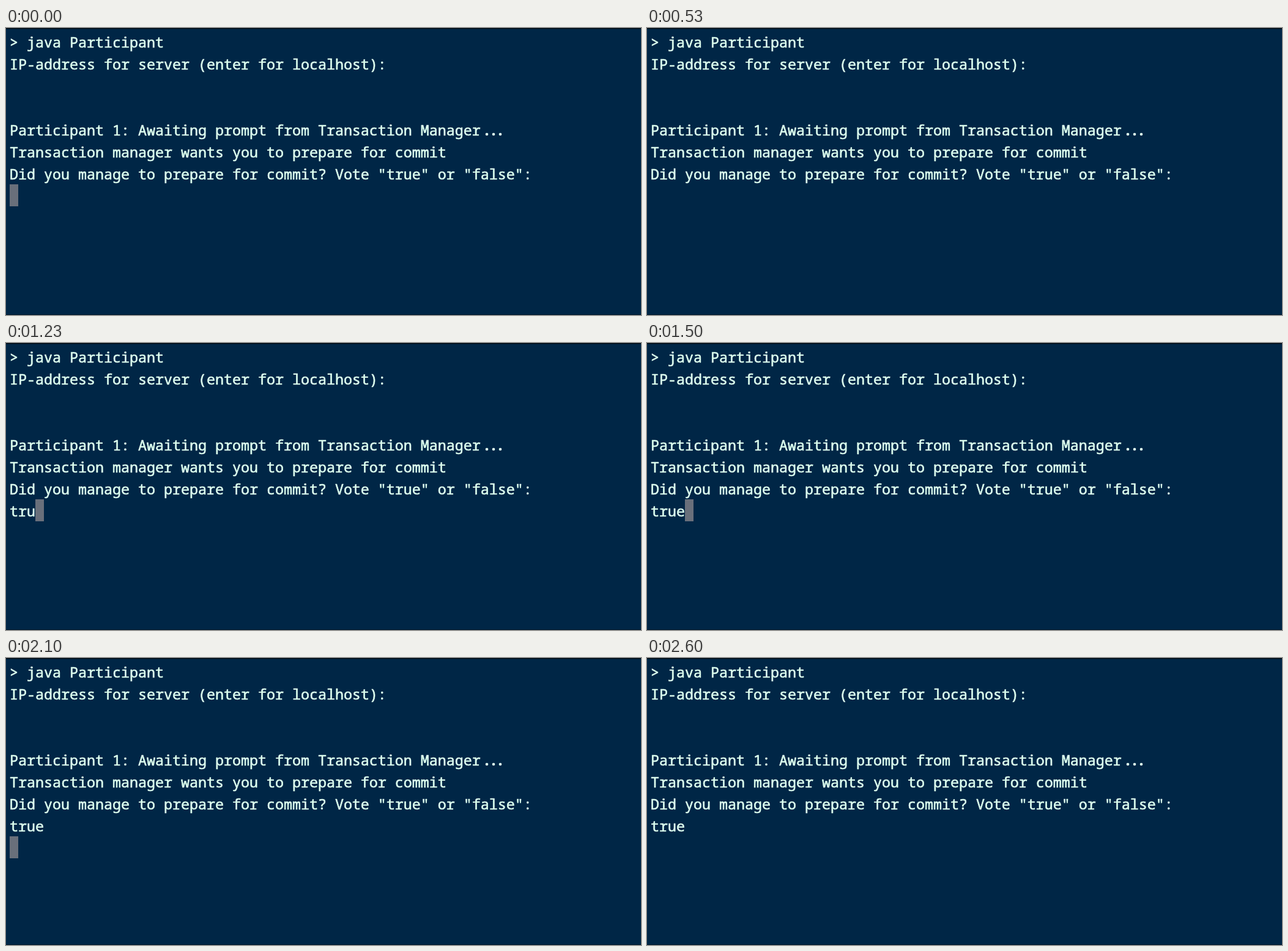
Animation, 1038 px wide and 470 px high, one loop 2650 ms. Source, as an HTML page with a canvas:

```html
<!DOCTYPE html>
<html lang="en">
<head>
<meta charset="utf-8">
<title>Terminal vote</title>
<style>
  html, body { margin: 0; width: 100%; height: 100%; overflow: hidden; background: #002646; }
  canvas { display: block; }
</style>
</head>
<body>
<canvas id="stage" width="1038" height="470"></canvas>
<script>
const ctx = document.getElementById('stage').getContext('2d');
const LOOP = 2650, LEFT = 6, TOP = 4, CELL = 14, ROW = 36, BASE = 28;
const INK = '#dffff0';
const OUTPUT = [
  '> java Participant',
  'IP-address for server (enter for localhost):',
  '', '',
  'Participant 1: Awaiting prompt from Transaction Manager',
  'Transaction manager wants you to prepare for commit',
  'Did you manage to prepare for commit? Vote "true" or "false":'
];
const ANSWER = 'true';
const KEYS = [800, 980, 1140, 1300];  // one keystroke per letter
const ENTER = 1600;
const HIDDEN = [[310, 800], [2200, LOOP]];  // cursor blinks off

// A thin outline gives the letters a medium weight.
function print(text, row) {
  const y = TOP + row * ROW + BASE;
  ctx.fillText(text, LEFT, y);
  ctx.strokeText(text, LEFT, y);
}

function rect(color, x, y, w, h) {
  ctx.fillStyle = color;
  ctx.fillRect(x, y, w, h);
}

function ellipsis(col, row) {
  const middle = LEFT + (col + 1.5) * CELL;
  for (const step of [-1, 0, 1]) {
    ctx.beginPath();
    ctx.arc(middle + step * 11, TOP + row * ROW + BASE - 2, 2.3, 0, 2 * Math.PI);
    ctx.fill();
  }
}

function draw(time) {
  const typed = KEYS.filter(key => time >= key).length;
  const entered = time >= ENTER;
  const inputRow = OUTPUT.length;

  rect('#002646', 0, 0, 1038, 470);
  rect('#040c15', 0, 0, 1038, 1);
  rect('#021729', 0, 1, 1038, 1);
  rect('#03192c', 0, 469, 1038, 1);

  if (!HIDDEN.some(([from, to]) => time >= from && time < to)) {
    const col = entered ? 0 : typed, row = inputRow + entered;
    rect('#696f7b', LEFT + col * CELL, TOP + row * ROW, CELL, ROW);
  }

  ctx.font = '23.333px "Noto Sans Mono", "DejaVu Sans Mono", monospace';
  ctx.fillStyle = ctx.strokeStyle = INK;
  ctx.lineWidth = 0.6;
  ctx.lineJoin = 'round';
  OUTPUT.forEach(print);
  print(ANSWER.slice(0, typed), inputRow);
  ellipsis(OUTPUT[4].length, 4);
}

function frame(now) {
  draw(now % LOOP);
  requestAnimationFrame(frame);
}
draw(0);
requestAnimationFrame(frame);
</script>
</body>
</html>
```
